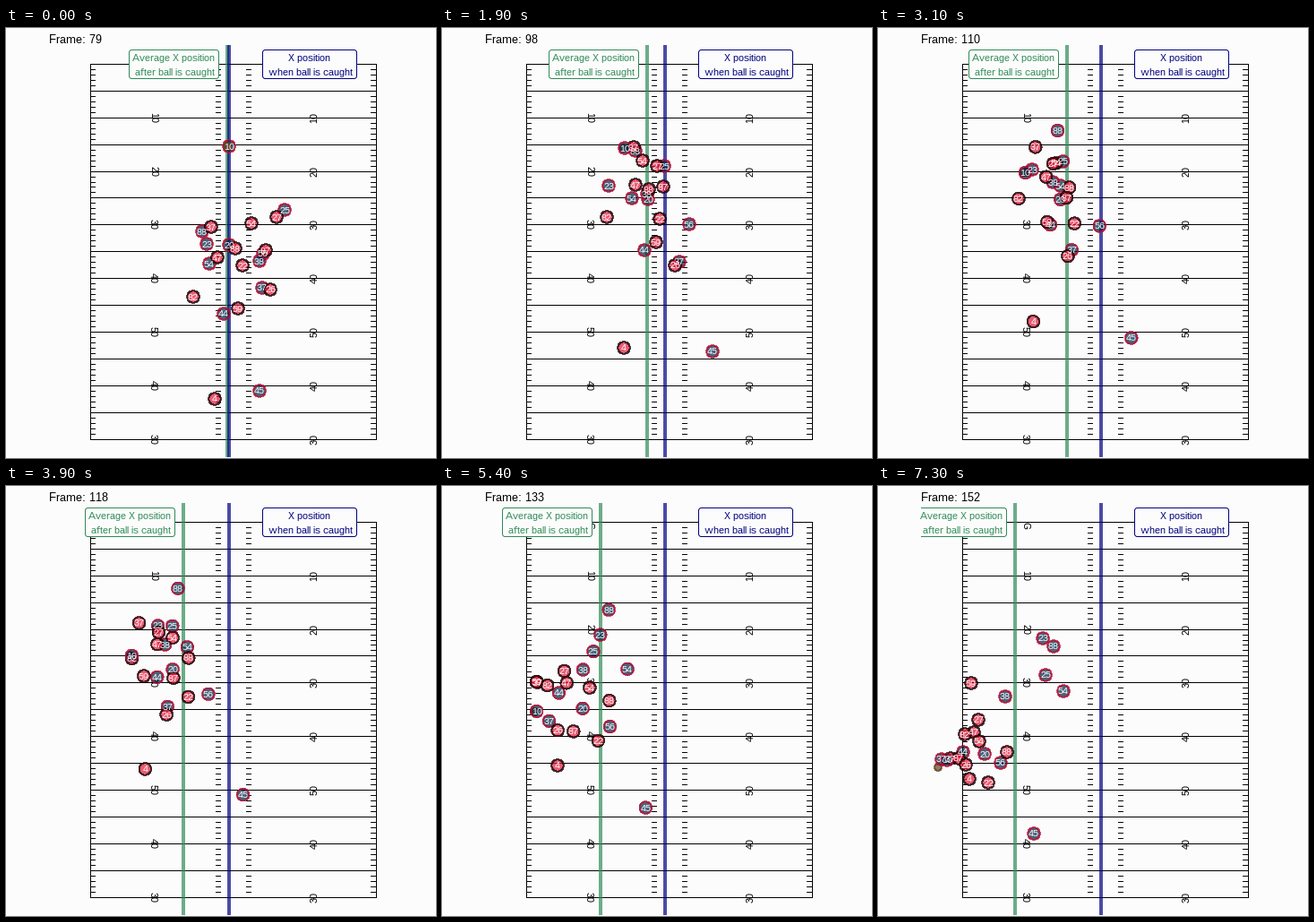
Recreate the animation shown at these times as a matplotlib script. Size 480x480 px, loop 7.4 s.

```python
import numpy as np
import matplotlib.pyplot as plt
from matplotlib.animation import FuncAnimation
from matplotlib.patches import Circle, FancyBboxPatch, Rectangle

SIZE, DPI = 480, 100
FRAMES, STEP = 74, 100
PX = 72 / DPI                      # points per pixel
BG, GREEN, NAVY = "#fcfcfc", "seagreen", "navy"
RED = dict(facecolor="#e31837", edgecolor="black")
BLUE = dict(facecolor="#002244", edgecolor="#c60c30")
BALL = dict(facecolor="#654321", edgecolor="#654321")

plt.rcParams.update({"font.family": "Liberation Sans",
                     "text.hinting": "native", "text.hinting_factor": 1})
fig = plt.figure(figsize=(SIZE / DPI, SIZE / DPI), dpi=DPI, facecolor=BG)
ax = fig.add_axes([0, 0, 1, 1])
ax.set_xlim(0, SIZE)
ax.set_ylim(SIZE, 0)
ax.axis("off")


def text(x, y, s, px, color="black", **kw):
    return ax.text(x, y, s, fontsize=px * PX, color=color, **kw)


# Field: yard lines, hash marks and numbers
YARD, TOP, LEFT, RIGHT = 5.98, 39.95, 94, 413
BOTTOM = TOP + 70 * YARD
thin = dict(color="black", lw=PX, solid_capstyle="projecting", zorder=1)
for x in (LEFT, RIGHT):
    ax.plot([x, x], [TOP, BOTTOM], **thin)
for yard in range(71):
    y = TOP + yard * YARD
    if yard % 5 == 0:
        ax.plot([LEFT, RIGHT], [y, y], **thin)
    else:
        for x in (LEFT, 234, 268, RIGHT - 6):
            ax.plot([x, x + 5], [y, y], **thin)
for k in range(1, 8):
    y = TOP + 10 * k * YARD
    for x, angle in ((164, 270), (344.5, 90)):
        text(x, y, str(10 * min(k, 10 - k)), 11.4, rotation=angle,
             ha="center", va="center", zorder=2)
text(164, 44, "G", 11.4, rotation=270, ha="center", va="center", zorder=2)

# Vertical markers
marker = dict(lw=4 * PX, alpha=0.7, solid_capstyle="butt")
mean_line, = ax.plot([0, 0], [19, 479], color=GREEN, zorder=3, **marker)
ax.plot([249, 249], [19, 479], color=NAVY, zorder=4, **marker)

# Captions, cut off at the panel's left edge
panel = Rectangle((48, 19), 412, 460, transform=ax.transData)
CAP_W = 100


def caption(x, width, color, *lines):
    box = FancyBboxPatch((x, 24.5), width, 32, fc=BG, ec=color, lw=PX, zorder=9,
                         boxstyle="round,pad=0,rounding_size=3")
    ax.add_patch(box)
    box.set_clip_path(panel)
    rows = [text(x + width / 2 - 0.5, y, s, 11, color, ha="center",
                 va="baseline", zorder=10)
            for y, s in zip((37, 53), lines)]
    return box, rows


mean_box, mean_rows = caption(139.5, CAP_W, GREEN,
                              "Average X position", " after ball is caught")
caption(286.5, 105, NAVY, "X position", " when ball is caught")
title = text(48, 16.6, "", 13, va="baseline")

# Players: each runs a cubic through four points, plus a pace shift all share
t = np.arange(FRAMES)
KEYS = [0, 19, 47, 73]
pace = -1.2e-5 * np.prod([t - k for k in KEYS], axis=0)
tokens = []


def token(style, number, path, radius=6.75):
    dot = Circle((0, 0), radius, lw=PX, alpha=0.7, zorder=6,
                 antialiased=False, **style)
    ax.add_patch(dot)
    label = text(0, 0, number, 10, "white", ha="center", va="baseline", zorder=7)
    tokens.append((dot, label, path))
    return dot


def run(style, number, *points):
    path = np.vander(t, 4) @ np.polyfit(KEYS, points, 3) + pace[:, None]
    token(style, number, path)
    return path


run(BLUE, 88, (219, 227), (216, 137), (187, 124), (196, 179))
run(BLUE, 23, (224, 241), (186, 176), (172, 160), (184, 170))
run(BLUE, 54, (227, 263), (212, 190), (204, 191), (207, 229))
run(BLUE, 44, (243, 319), (226, 248), (147, 218), (95, 297))
run(BLUE, 45, (283, 405), (302, 361), (245, 350), (174, 388))
run(BLUE, 20, (249, 242), (230, 191), (170, 226), (119, 299))
run(BLUE, 25, (311, 203), (248, 154), (173, 170), (187, 211))
run(BLUE, 56, (287, 252), (276, 219), (205, 250), (137, 309))
run(BLUE, 38, (283, 260), (229, 185), (165, 190), (142, 235))
run(BLUE, 37, (286, 290), (265, 261), (146, 252), (71, 305))

run(RED, 37, (229, 222), (214, 133), (124, 185), (81, 304))
run(RED, 47, (236, 256), (216, 175), (152, 197), (107, 275))
run(RED, 82, (209, 300), (184, 211), (127, 205), (97, 277))
run(RED, 59, (259, 313), (239, 239), (124, 214), (104, 220))
run(RED, 4, (233, 414), (203, 357), (140, 311), (102, 327))
run(RED, 88, (256, 246), (231, 180), (195, 215), (144, 297))
run(RED, 22, (264, 265), (243, 213), (188, 260), (123, 331))
run(RED, 54, (274, 218), (224, 148), (175, 197), (113, 285))
run(RED, 27, (302, 211), (240, 154), (150, 184), (112, 261))
run(RED, 87, (290, 248), (247, 177), (165, 246), (90, 304))
run(RED, 26, (295, 292), (260, 265), (150, 262), (98, 311))

# The carrier holds the ball slightly ahead, then reaches out at the end
carrier = run(BLUE, 10, (249, 132), (204, 134), (120, 222), (77, 306))
reach = (t / t[-1]) ** 8
ball_path = carrier + np.column_stack([-1.5 - 8.5 * reach, 8 * reach])
ball = token(BALL, "", ball_path, 4)
mean_x = np.cumsum(ball_path[:, 0]) / (t + 1)


def update(i):
    title.set_text(f"Frame: {79 + i}")
    x = round(mean_x[i])
    mean_line.set_xdata([x, x])
    mean_box.set_x(x - 9.5 - CAP_W)
    for row in mean_rows:
        row.set_x(x - 10 - CAP_W / 2)
    for dot, label, path in tokens:
        x, y = path[i]
        dot.center = x, y
        label.set_position((x, y + 3.5))
    ball.set_zorder(6 if i == 0 else 5)   # on top only at the catch
    return []


anim = FuncAnimation(fig, update, frames=FRAMES, interval=STEP,
                     repeat=True, repeat_delay=0, blit=False)
plt.show()
```
